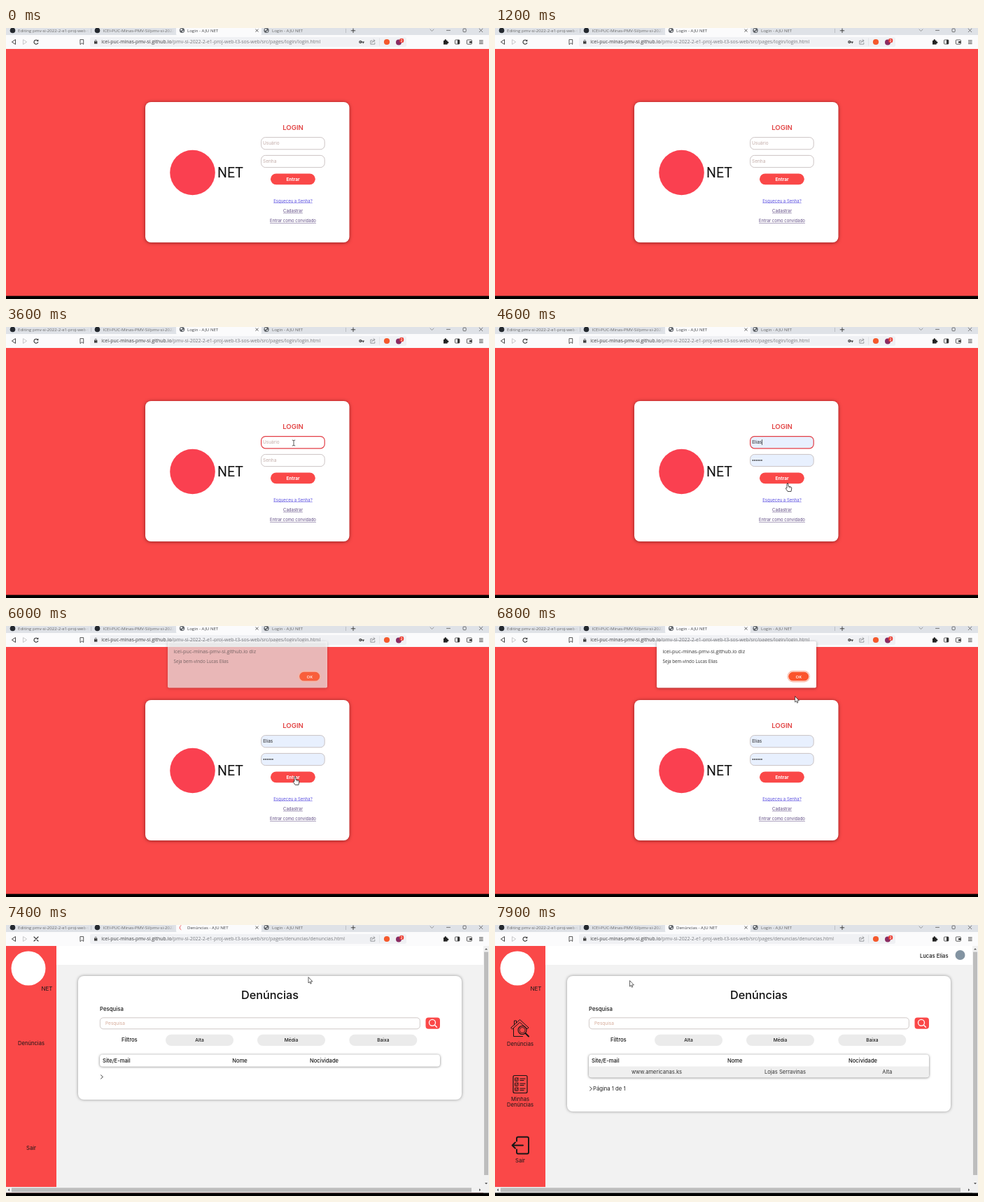
An HTML page with a canvas for the animation above (8000 ms loop, 690 px wide and 388 px high).

```html
<!DOCTYPE html>
<html lang="pt-BR">
<head>
<meta charset="utf-8">
<title>Login</title>
<style>
html, body { margin: 0; width: 100%; height: 100%; overflow: hidden; }
canvas { display: block; width: 690px; height: 388px; }
</style>
</head>
<body>
<canvas id="stage"></canvas>
<script>
const W = 690, H = 388, LOOP = 8000, TICK = 100;
const RED = '#fa4848', INK = '#161616';
const INTER = 'Inter, sans-serif', UI = '"Open Sans", sans-serif';
const SITE = 'AJU NET', USER = 'Elias', FULL_NAME = 'Lucas Elias';
const HOST = 'icei-puc-minas-pmv-si.github.io';
const ROOT = '/pmv-si-2022-2-e1-proj-web-t3-sos-web/src/pages/';

const canvas = document.getElementById('stage');
const ctx = canvas.getContext('2d');
const ratio = window.devicePixelRatio || 1;
canvas.width = W * ratio;
canvas.height = H * ratio;

// Pointer path: time, x, y, shape used from that time on
const PATH = [
  [1900, 296, 386, 'arrow'], [2400, 405, 172, 'beam'], [2600, 411, 166, 'beam'],
  [3700, 411, 166, 'beam'], [3900, 414, 196, 'hand'], [4100, 417, 221, 'hand'],
  [4500, 417, 221, 'hand'], [4600, 418, 224, 'hand'], [4700, 413, 224, 'hand'],
  [4800, 413, 224, 'hand'], [5000, 413, 216, 'hand'], [6300, 413, 216, 'hand'],
  [6400, 415, 205, 'arrow'], [6900, 432, 75, 'arrow'], [7700, 432, 75, 'arrow'],
  [7900, 192.5, 80, 'arrow']
];

function rect(x, y, w, h, fill) {
  ctx.fillStyle = fill;
  ctx.fillRect(x, y, w, h);
}

function box(x, y, w, h, r, fill, stroke, width = 0.8) {
  ctx.beginPath();
  ctx.roundRect(x, y, w, h, r);
  if (fill) { ctx.fillStyle = fill; ctx.fill(); }
  if (stroke) { ctx.strokeStyle = stroke; ctx.lineWidth = width; ctx.stroke(); }
}

function shadowBox(x, y, w, h, r, fill, shade, blur, dy = 0) {
  ctx.save();
  ctx.shadowColor = shade;
  ctx.shadowBlur = blur * ratio;
  ctx.shadowOffsetY = dy * ratio;
  box(x, y, w, h, r, fill);
  ctx.restore();
}

function disc(x, y, r, fill) {
  ctx.beginPath();
  ctx.arc(x, y, r, 0, Math.PI * 2);
  ctx.fillStyle = fill;
  ctx.fill();
}

function ring(x, y, r, color, width, from = 0, to = Math.PI * 2) {
  ctx.beginPath();
  ctx.arc(x, y, r, from, to);
  ctx.strokeStyle = color;
  ctx.lineWidth = width;
  ctx.stroke();
}

// Strokes or fills an SVG path placed at x, y
function shape(d, x, y, stroke, width = 0.9, fill) {
  const path = new Path2D(d);
  ctx.save();
  ctx.translate(x, y);
  ctx.lineJoin = ctx.lineCap = 'round';
  if (fill) { ctx.fillStyle = fill; ctx.fill(path); }
  if (stroke) { ctx.strokeStyle = stroke; ctx.lineWidth = width; ctx.stroke(path); }
  ctx.restore();
}

function text(str, x, y, size, color = INK, { font = INTER, weight = 400, align = 'left' } = {}) {
  ctx.font = `${weight} ${size}px ${font}`;
  ctx.textAlign = align;
  ctx.fillStyle = color;
  ctx.fillText(str, x, y);
  return ctx.measureText(str).width;
}

function link(str, y, color) {
  const w = text(str, 410, y, 6, color, { align: 'center' });
  rect(410 - w / 2, y + 0.9, w, 0.5, color);
}

function tabTitle(str, x, right, color = '#666666') {
  ctx.save();
  ctx.beginPath();
  ctx.rect(x, 0, right - x, 10);
  ctx.clip();
  const fade = ctx.createLinearGradient(right - 10, 0, right, 0);
  fade.addColorStop(0, color);
  fade.addColorStop(1, color + '00');
  text(str, x, 5.8, 6.1, fade, { font: UI });
  ctx.restore();
}

function globe(x, y) {
  disc(x, y, 3.6, '#5f6368');
  shape('M-2.6-1 Q-1-3 .6-2.2 L0-.4 L-1.4.4Z M.4.6 L2.6.2 Q2 2.4.4 2.8Z', x, y, null, 0, '#eceef0');
}

function drawBrowser(t) {
  const loading = t >= 7300 && t < 7600;
  const moved = t >= 7300;
  rect(0, 0, W, 10, '#dfe2e7');
  rect(0, 10, W, 20, '#fbfbfc');
  box(243, -4, 122, 15, 3, '#fbfbfc');
  rect(121.5, 1, 0.6, 6, '#a5a8ad');
  rect(485, 1, 0.6, 6, '#a5a8ad');

  disc(9.5, 3.5, 3.8, '#24292f');
  disc(130.5, 3.5, 3.8, '#24292f');
  tabTitle('Editing pmv-si-2022-2-e1-proj-web-t3', 17, 119);
  tabTitle('ICEI-PUC-Minas-PMV-SI/pmv-si-2022-2', 138.5, 240);
  globe(372, 3.5);
  tabTitle(`Login - ${SITE}`, 380, 470);
  let title = `Login - ${SITE}`;
  if (moved) title = t < 7400 ? `https://${HOST}` : `Denúncias - ${SITE}`;
  tabTitle(title, 259, 354, '#3f4145');
  if (loading) {
    const a = t / 100 * 1.3;
    ring(251.5, 3.8, 3.3, t < 7400 ? '#f08a8a' : '#ee4a4a', 0.9, a, a + (t < 7400 ? 1.2 : 2.4));
  } else globe(251.5, 3.5);
  shape('M-1.7-1.7L1.7 1.7M1.7-1.7L-1.7 1.7', 358.5, 3.6, '#333', 0.8);
  shape('M-2.8 0H2.8M0-2.8V2.8', 496, 3.8, '#333', 0.9);

  shape('M-2.5-1L0 1.5L2.5-1', 608.5, 3, '#777', 0.7);
  shape('M-2.5 0H2.5', 632, 3.4, '#444', 0.7);
  box(653, 1, 4.2, 4.6, 0.8, null, '#444', 0.7);
  shape('M-2.3-2.3L2.3 2.3M2.3-2.3L-2.3 2.3', 678.5, 3.4, '#444', 0.7);

  shape('M2.2-3.2L-2.6 0L2.2 3.2Z', 11, 20, '#333');
  shape('M-2.2-3.2L2.6 0L-2.2 3.2Z', 27, 20, '#c2c2c5');
  if (loading) shape('M-3-3L3 3M3-3L-3 3', 43, 20, '#333', 1.1);
  else {
    ring(43, 20.2, 3, '#333', 1.1, 0.3, 5.5);
    shape('M3.4-3.6V-.8H.6Z', 43, 20, null, 0, '#333');
  }
  shape('M-2.2-3.4H2.2V3.4L0 1.6L-2.2 3.4Z', 108.5, 20, '#444', 0.9);

  box(120, 13, 452, 14, 3, '#f0f1f4');
  ring(128.2, 18.7, 1.4, '#444', 0.8, Math.PI, 0);
  rect(126, 19, 4.4, 3.6, '#444');
  const w = text(HOST, 136.3, 22.4, 6.92, '#3c3d40', { font: UI });
  text(ROOT + (moved ? 'denuncias/denuncias.html' : 'login/login.html'),
    136.3 + w, 22.4, 6.92, '#7a7c80', { font: UI });
  if (!moved) {
    ring(506.3, 20, 1.5, '#333', 1.2);
    shape('M-1.2 0H3.4M2.2 0V1.6', 508, 20, '#333', 1.2);
  }
  shape('M-1-1.8H-3.2V3.2H2.8V1M-1.4 1.2Q-1.2-1.6 2-1.8M1-3.4L3.2-1.8L1-.2', 524, 20, '#85878b', 0.8);
  rect(533.5, 14.5, 0.5, 11, '#d5d7db');
  disc(544, 20, 4.1, '#f5592c');
  disc(561, 20.5, 4, '#8a2c62');
  box(562.2, 15, 6, 6, 2, '#ec3f34');
  text('2', 565.2, 19.6, 4.4, '#fff', { align: 'center', weight: 600 });

  rect(625, 18, 5.6, 5.6, '#222');
  disc(627.8, 17.7, 1.4, '#222');
  disc(631, 20.8, 1.4, '#222');
  box(641.5, 17, 6.4, 6, 1, null, '#333');
  rect(645, 17, 2.9, 6, '#333');
  box(658.4, 17, 7, 6.2, 1, null, '#333');
  box(662, 19, 3.6, 2.4, 0.5, '#333');
  for (const dy of [-2.2, 0, 2.2]) rect(676, 19.7 + dy, 5.6, 0.9, '#333');
}

function drawLogin(t) {
  const filled = t >= 3800;
  const focused = t >= 3000 && t < 5900;
  rect(0, 30, W, 354, RED);
  rect(0, 383.6, W, 5, '#000');
  shadowBox(199, 106, 291.5, 201, 8, '#fff', 'rgba(60,0,0,.6)', 5, 0.6);
  disc(266.5, 207, 32.3, '#fa4050');
  text('NET', 302, 213.8, 19.5, '#111', { font: 'Roboto, sans-serif' });
  text('LOGIN', 410, 146, 9.6, '#e24444', { weight: 600, align: 'center' });

  const paper = filled ? '#e8f0fe' : '#fff';
  box(364.6, 156.6, 90.6, 17.2, 6, paper, focused ? '#e33e46' : '#bfb5b5', focused ? 1.2 : 0.8);
  box(364.6, 182.4, 90.6, 17.2, 6, paper, '#bfb5b5');
  if (filled) {
    text(USER, 367.2, 167.4, 6.4, '#222');
    for (let i = 0; i < 6; i++) disc(368.4 + i * 2.5, 190.8, 0.9, '#222');
  } else {
    text('Usuário', 367, 167.4, 6.5, '#c0aaa6');
    text('Senha', 367, 193.2, 6.5, '#c0aaa6');
  }
  // The caret restarts its blink when the choice is confirmed at the end of the name
  const clickAt = t < 4400 ? 3100 : 4400;
  if (focused && t >= clickAt && Math.floor((t - clickAt) / 500) % 2 === 0) {
    rect(t < 4400 ? 366.8 : 381.3, 161, 0.7, 8, '#222');
  }

  box(378, 208.4, 63.8, 15.8, 7.9, RED);
  text('Entrar', 410, 218.6, 6.4, '#fff', { weight: 700, align: 'center' });
  link('Esqueceu a Senha?', 249.6, '#5a4fe0');
  link('Cadastrar', 263.9, '#5f4b83');
  link('Entrar como convidado', 278.1, '#5f4b83');
}

function drawDialog(alpha) {
  ctx.save();
  ctx.globalAlpha = alpha;
  shadowBox(231, 22, 228, 66.5, 2, '#fff', 'rgba(0,0,0,.35)', 4, 1);
  text(`${HOST} diz`, 239.5, 39.3, 7.3, '#333', { font: UI });
  text(`Seja bem-vindo ${FULL_NAME}`, 239.5, 53.4, 6.3, '#333', { font: UI });
  ctx.globalAlpha = Math.min(1, alpha * 1.4);
  box(418, 64.6, 31.4, 15.2, 7.6, null, '#f9b7a4', 1.2);
  box(419.2, 65.8, 29, 12.8, 6.4, '#fb542b');
  text('OK', 433.7, 74.5, 6, '#fff', { font: UI, weight: 600, align: 'center' });
  ctx.restore();
}

function drawSidebar(icons) {
  rect(0, 30, 72, 345, RED);
  disc(32, 62, 24.5, '#fff');
  text('NET', 66.5, 93.5, 8, INK, { align: 'right' });
  const label = (str, y) => text(str, 36, y, 7.6, INK, { align: 'center' });
  if (!icons) {
    label('Denúncias', 172);
    label('Sair', 322.4);
    return;
  }
  label('Denúncias', 172.8);
  label('Minhas', 252.4);
  label('Denúncias', 260.4);
  label('Sair', 339.8);

  shape('M-12.5-1L0-12.5L12.5-1L10.5.8L0-8.6L-10.5.8ZM-9 .6V11.5H4M-8-5V-11H-5V-8', 35.5, 148, INK, 1);
  ring(39, 150.5, 6, INK, 1.1);
  ring(39, 150.5, 4, INK, 0.8);
  shape('M4.5 4.5L9 9', 39, 150.5, INK, 2);

  box(26, 215.5, 20, 25, 2, null, INK, 1.2);
  for (let i = 0; i < 3; i++) {
    const y = 219 + i * 7;
    box(28.6, y, 4.4, 4.4, 0.5, null, INK, 0.9);
    shape('M-1.2 0L0 1.2L2.4-2', 30.6, y + 2, INK, 0.8);
    rect(35.5, y + 0.6, 8, 1, INK);
    rect(35.5, y + 3, 6, 1, INK);
  }
  shape('M-5-6V-10Q-5-12-3-12H10Q12-12 12-10V10Q12 12 10 12H-3Q-5 12-5 10V6M4 0H-11M-7-4.2L-11.4 0L-7 4.2', 36, 315.5, INK, 1.9);
}

function drawScrollbars() {
  rect(682, 30, 8, 354, '#f1f1f1');
  rect(0, 375, W, 8.6, '#f1f1f1');
  rect(683, 38.5, 6, 319.5, '#bdbdbd');
  rect(8, 376.3, 657, 6, '#bdbdbd');
  const arrow = (d, x, y) => shape(d, x, y, null, 0, '#555');
  arrow('M-2 1L0-1.2L2 1Z', 686, 34.5);
  arrow('M-2-1L0 1.2L2-1Z', 686, 370);
  arrow('M1-2L-1.2 0L1 2Z', 4, 379.3);
  arrow('M-1-2L1.2 0L-1 2Z', 677, 379.3);
  rect(0, 383.6, W, 5, '#000');
}

function drawReports(t) {
  const icons = t >= 7500, ready = t >= 7600;
  const head = { weight: 500 }, mid = { align: 'center' };
  rect(72, 30, 610, 27, '#fff');
  rect(72, 57, 610, 318, '#f2f2f2');
  drawSidebar(icons);
  if (ready) {
    text(FULL_NAME, 647.5, 46.6, 7.6, INK, { weight: 500, align: 'right' });
    disc(664.5, 43, 7, '#8394a2');
  }
  shadowBox(103, 73, 548, ready ? 194 : 177, 8, '#fff', 'rgba(0,0,0,.4)', 4);
  text('Denúncias', 377, 105.8, 16.3, '#111', { weight: 500, align: 'center' });
  text('Pesquisa', 134, 122.8, 7.8, INK, head);
  box(134.4, 132.8, 457, 16, 4.5, '#fff', '#c4bcb9');
  text('Pesquisa', 142, 143.2, 6.5, '#d5aa98');
  box(599.5, 132.4, 20.5, 16.4, 4, RED);
  ring(609, 139.8, 4.5, '#fff', 1.3);
  shape('M3.4 3.4L6.4 6.4', 609, 139.8, '#fff', 1.4);

  text('Filtros', 165, 167.3, 7.7, INK, head);
  [['Alta', 276.5], ['Média', 407.5], ['Baixa', 538.8]].forEach(([name, x]) => {
    box(x - 48.5, 156.8, 97, 16.2, 8, '#ebebeb');
    text(name, x, 167.3, 6.6, INK, { weight: 500, align: 'center' });
  });

  shadowBox(134, 185.5, 486, ready ? 32.8 : 17.2, 4, '#fff', 'rgba(0,0,0,.55)', 3.5, 0.4);
  text('Site/E-mail', 138, 196.8, 7.6, INK, head);
  text('Nome', ready ? 332 : 323.3, 196.8, 7.6, INK, head);
  text('Nocividade', ready ? 505 : 434, 196.8, 7.6, INK, head);
  if (ready) {
    box(134, 202.4, 486, 15.9, [0, 0, 4, 4], '#efefef');
    text('www.americanas.ks', 231, 212.9, 7.6, '#333', mid);
    text('Lojas Serravinas', 414.5, 212.9, 7.6, '#333', mid);
    text('Alta', 560.3, 212.9, 7.6, '#333', mid);
    text('Página 1 de 1', 140, 237, 7.7, '#222');
  }
  shape('M-1.4-2.6L1.4 0L-1.4 2.6', 137, ready ? 234.4 : 217.5, '#222', 0.9);
  drawScrollbars();
}

function drawPointer(t) {
  if (t < 2000) return;
  let i = PATH.length - 1;
  while (PATH[i][0] > t) i--;
  const [t0, x0, y0, kind] = PATH[i];
  const [t1, x1, y1] = PATH[i + 1] || [LOOP, x0, y0];
  const k = (t - t0) / (t1 - t0);
  const x = x0 + (x1 - x0) * k, y = y0 + (y1 - y0) * k;
  if (kind === 'beam') {
    shape('M-1.8-4Q0-4 0-3Q0-4 1.8-4M0-3V3M-1.8 4Q0 4 0 3Q0 4 1.8 4', x, y, '#333', 0.8);
  } else if (kind === 'hand') {
    shape('M0 0Q1 0 1 1V4L4.6 5Q6 5.4 5.8 7L5 11.5H.2L-2.6 7.4Q-2.8 6-1 6.6V1Q-1 0 0 0Z', x, y, '#222', 0.8, '#fff');
    shape('M2.2 4.6V6.2M3.8 5V6.4', x, y, '#222', 0.5);
  } else {
    shape('M0 0V8L1.8 6.4L3 9.2L4.3 8.6L3.1 5.9H5.5Z', x, y, '#222', 0.7, '#fff');
  }
}

function dialogAlpha(t) {
  if (t < 6000 || t >= 7200) return 0;
  if (t < 6100) return 0.64;
  return t < 7100 ? 1 : 0.5;
}

function frame(now) {
  const t = Math.floor((now % LOOP) / TICK) * TICK;
  ctx.setTransform(ratio, 0, 0, ratio, 0, 0);
  if (t < 7400) drawLogin(t);
  else drawReports(t);
  drawBrowser(t);
  const alpha = dialogAlpha(t);
  if (alpha) drawDialog(alpha);
  drawPointer(t);
  requestAnimationFrame(frame);
}

requestAnimationFrame(frame);
</script>
</body>
</html>
```
